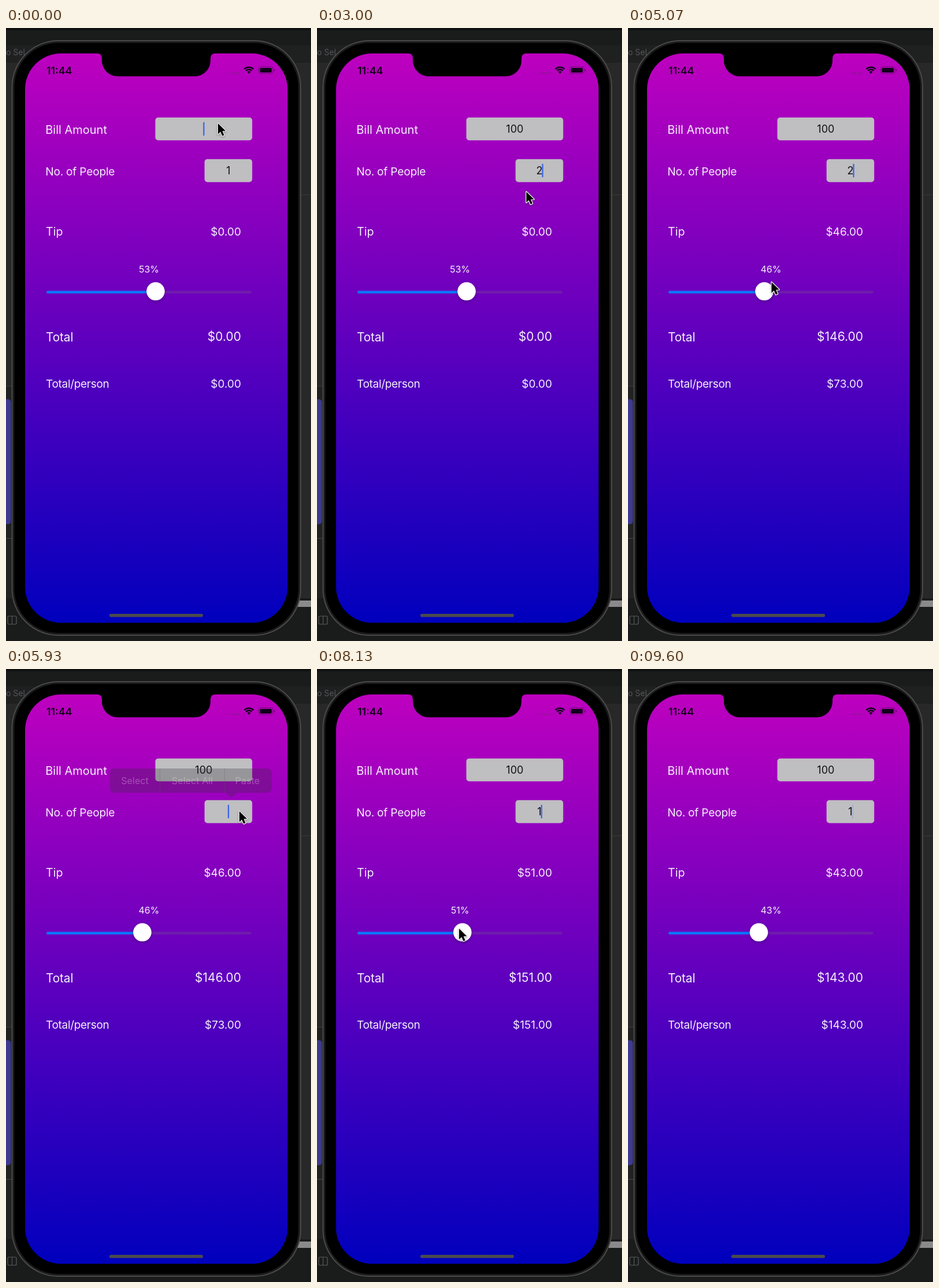
Animation, 528 px wide and 1060 px high, one loop 9670 ms. Source, as an HTML page with a canvas:

```html
<!DOCTYPE html>
<html lang="en">
<head>
<meta charset="utf-8">
<title>Tip calculator</title>
<style>
  html, body { margin: 0; width: 100%; height: 100%; overflow: hidden; background: #1a1b1b; }
  canvas { display: block; }
</style>
</head>
<body>
<canvas id="stage" width="528" height="1060"></canvas>
<script>
const ctx = document.getElementById('stage').getContext('2d');
const LOOP = 9670, FPS = 15;
const FONT = 'Inter, Roboto, sans-serif';

// Keyframes: time in ms, then values
const KNOB = [[3330, 259], [3730, 299], [4130, 284.5], [4600, 214], [5000, 236],
  [6800, 236], [7260, 296.3], [7600, 312], [8130, 251.8], [8530, 207], [8930, 226.5]];
const POINTER = [[400, 367, 165], [1100, 367, 165], [1600, 385, 245], [2900, 385, 245],
  [3270, 259, 458], [3330, 259, 458], [3730, 299, 459], [4130, 284, 460], [4600, 214, 456],
  [5000, 236, 455], [5400, 404, 246], [6270, 404, 246], [6700, 240, 448], [6800, 240, 448],
  [7260, 305, 446], [7600, 318, 447], [8130, 246, 449], [8530, 202, 450],
  [8930, 222, 450], [9070, 222, 450], [9530, 540, 560]];
// Focus and edits: start, focused field, bill, people, caret at the start of the text
const EDITS = [[0, 'bill', '', '1'], [470, 'bill', '1', '1'], [730, 'bill', '10', '1'],
  [930, 'bill', '100', '1'], [1600, 'people', '100', '1', true], [2130, 'people', '100', '1'],
  [2400, 'people', '100', ''], [2800, 'people', '100', '2'], [5860, 'people', '100', ''],
  [6100, 'people', '100', '1']];

const clamp = v => Math.max(0, Math.min(1, v));
const ramp = (t, from, to) => clamp((t - from) / (to - from));

function sample(keys, t) {
  const next = keys.findIndex(k => k[0] > t);
  if (next === 0) return keys[0].slice(1);
  if (next < 0) return keys[keys.length - 1].slice(1);
  const a = keys[next - 1], b = keys[next];
  const p = ramp(t, a[0], b[0]), e = p * p * (3 - 2 * p);
  return a.slice(1).map((v, i) => v + (b[i + 1] - v) * e);
}

function box(x, y, w, h, r, fill, stroke) {
  ctx.beginPath();
  ctx.roundRect(x, y, w, h, r);
  if (fill) { ctx.fillStyle = fill; ctx.fill(); }
  if (stroke) { ctx.strokeStyle = stroke; ctx.stroke(); }
}

function disc(x, y, r, fill) {
  ctx.beginPath();
  ctx.arc(x, y, r, 0, 7);
  ctx.fillStyle = fill;
  ctx.fill();
}

function text(str, x, y, size, { align = 'left', color = '#f5effa', weight = 400, spacing = 0 } = {}) {
  ctx.font = `${weight} ${size}px ${FONT}`;
  ctx.letterSpacing = spacing + 'px';
  ctx.textAlign = align;
  ctx.fillStyle = color;
  ctx.fillText(str, x, y);
  return ctx.measureText(str).width;
}

function drawDesktop() {
  box(0, 0, 528, 1060, 0, '#1a1b1b');
  box(0, 0, 528, 4, 0, '#101111');
  box(0, 30, 528, 30, 0, '#1f2020');
  text('o Sel', 0, 47, 14, { color: '#55565a' });
  box(0, 60, 528, 926, 0, '#282828');
  box(0, 619, 12, 1, 0, '#3c3c3d');
  box(0, 620, 12, 366, 0, '#222223');
  box(-10, 642, 18.5, 216, 5, '#3d3a90');
  box(0, 882, 12, 1, 0, '#48484a');
  box(505, 288, 23, 1, 0, '#39393a');
  box(505, 990, 23, 11, 0, '#8a8a8b');
  ctx.lineWidth = 1.2;
  box(3, 1017, 15, 14, 2, null, '#5b5c5e');
  box(10, 1017, 1, 14, 0, '#5b5c5e');
}

function drawPhone() {
  ctx.lineWidth = 2;
  box(10.5, 22, 499.5, 1028, 80, '#1a1a1a', '#4a4a4b');
  box(14.5, 26, 491.5, 1020, 76, '#000');
  const sky = ctx.createLinearGradient(0, 44, 0, 1028);
  sky.addColorStop(0, '#be00bf');
  sky.addColorStop(1, '#0000bd');
  box(33, 44, 454.5, 984.5, 62, sky);

  ctx.fillStyle = '#000';
  ctx.beginPath();
  ctx.moveTo(158, 43);
  ctx.lineTo(158, 44);
  ctx.quadraticCurveTo(166, 44, 166, 53);
  ctx.arcTo(166, 83.5, 196, 83.5, 27);
  ctx.arcTo(354, 83.5, 354, 53, 27);
  ctx.lineTo(354, 53);
  ctx.quadraticCurveTo(354, 44, 362, 44);
  ctx.lineTo(362, 43);
  ctx.fill();

  text('11:44', 70, 79.5, 17.8, { color: '#14001a', weight: 600 });
  for (let i = 0; i < 4; i++) disc(387.5 + i * 5.3, 78, 1.6, '#8b168f');
  drawWifi(420.5, 78.5);
  ctx.lineWidth = 1;
  box(437.5, 67, 24.5, 12, 3.5, null, '#6b0a70');
  box(439.5, 69, 20.5, 8, 2, '#12001a');
  box(463.5, 71, 1.8, 4, 1, '#6b0a70');
  box(179, 1013, 162, 5.6, 2.8, '#4b4b4f');
}

function drawWifi(x, y) {
  ctx.strokeStyle = '#12001a';
  ctx.lineWidth = 2.6;
  for (const r of [7.2, 11.3]) {
    ctx.beginPath();
    ctx.arc(x, y + 0.5, r, -Math.PI * 0.75, -Math.PI * 0.25);
    ctx.stroke();
  }
  ctx.beginPath();
  ctx.moveTo(x, y + 0.5);
  ctx.arc(x, y + 0.5, 4.3, -Math.PI * 0.75, -Math.PI * 0.25);
  ctx.fillStyle = '#12001a';
  ctx.fill();
}

function drawFields(t) {
  const edit = EDITS.filter(e => e[0] <= t).pop();
  const [start, focus, bill, people, atStart] = edit;
  const phase = (t - start) / 1000 % 1;
  const caretAlpha = 1 - ramp(phase, 0.42, 0.52) + ramp(phase, 0.8, 0.9);
  const field = (name, value, x, y, w) => {
    box(x, y, w, 39.6, 5, '#bfbec1');
    const middle = x + w / 2;
    const width = text(value, middle, y + 26.5, 18, { align: 'center', color: '#111' });
    if (focus !== name) return;
    ctx.globalAlpha = caretAlpha;
    const side = atStart ? -1 : 1;
    box(middle + side * width / 2 - 1, y + 8, 2.2, 23.5, 1, '#3562e6');
    ctx.globalAlpha = 1;
  };
  field('bill', bill, 258.5, 154.7, 167.7);
  field('people', people, 343.7, 226.8, 82.5);
}

function drawResults(t, knobX) {
  const percent = Math.floor((knobX - 85.2) / 3.24);
  const started = t > KNOB[0][0];
  const tip = started ? percent : 0;
  const total = started ? 100 + percent : 0;
  const guests = t > 6800 ? 1 : 2;
  const money = (value, y, size) => text('$' + value.toFixed(2), 407, y, size, { align: 'right' });

  text('Bill Amount', 68.2, 183, 20);
  text('No. of People', 68.2, 255, 19.2, { spacing: -0.25 });
  text('Tip', 69, 359, 19.6);
  text('Total', 69, 542, 20.8, { spacing: -0.1 });
  text('Total/person', 69, 622, 19.1, { spacing: -0.35 });
  money(tip, 358.5, 19);
  money(total, 541, 21);
  money(total / guests, 622, 19);
  text(percent + '%', 247.5, 423.3, 16, { align: 'center' });
}

function drawSlider(x) {
  box(70, 454.4, 355, 4.6, 2.3, 'rgba(112,62,150,.45)');
  box(70, 454.4, x - 70, 4.6, 2.3, '#0877fa');
  ctx.save();
  ctx.shadowColor = 'rgba(0,0,0,.25)';
  ctx.shadowBlur = 6;
  ctx.shadowOffsetY = 2;
  disc(x, 455.3, 15.8, '#fff');
  ctx.restore();
}

function drawMenu(t) {
  const alpha = ramp(t, 5530, 5670) * (1 - ramp(t, 5830, 5975));
  if (!alpha) return;
  ctx.globalAlpha = alpha;
  box(180, 172, 280, 42, 8, '#303034');
  ctx.beginPath();
  ctx.moveTo(381, 214);
  ctx.lineTo(390, 222);
  ctx.lineTo(399, 214);
  ctx.fill();
  box(266, 172, 1, 42, 0, '#58585c');
  box(378, 172, 1, 42, 0, '#58585c');
  for (const [label, x] of [['Select', 223], ['Select All', 322.5], ['Paste', 418]])
    text(label, x, 199, 16.2, { align: 'center', color: '#fff' });
  ctx.globalAlpha = 1;
}

function drawPointer(x, y) {
  const points = [[0, 0], [0, 18.5], [4.3, 14.5], [7.4, 21.6], [10.6, 20.2], [7.6, 13.2], [13.2, 13]];
  ctx.save();
  ctx.translate(x, y);
  ctx.beginPath();
  points.forEach(p => ctx.lineTo(...p));
  ctx.closePath();
  ctx.shadowColor = 'rgba(0,0,0,.35)';
  ctx.shadowBlur = 3;
  ctx.shadowOffsetY = 1;
  ctx.lineWidth = 2.6;
  ctx.lineJoin = 'round';
  ctx.strokeStyle = '#eee';
  ctx.stroke();
  ctx.shadowColor = 'transparent';
  ctx.fillStyle = '#000';
  ctx.fill();
  ctx.restore();
}

function render(now) {
  const t = Math.floor(now % LOOP * FPS / 1000 + 0.06) * 1000 / FPS;
  const [knobX] = sample(KNOB, t);
  drawDesktop();
  drawPhone();
  drawFields(t);
  drawResults(t, knobX);
  drawSlider(knobX);
  drawMenu(t);
  drawPointer(...sample(POINTER, t));
}

const began = performance.now();
function tick() {
  render(performance.now() - began);
  requestAnimationFrame(tick);
}
tick();
</script>
</body>
</html>
```
